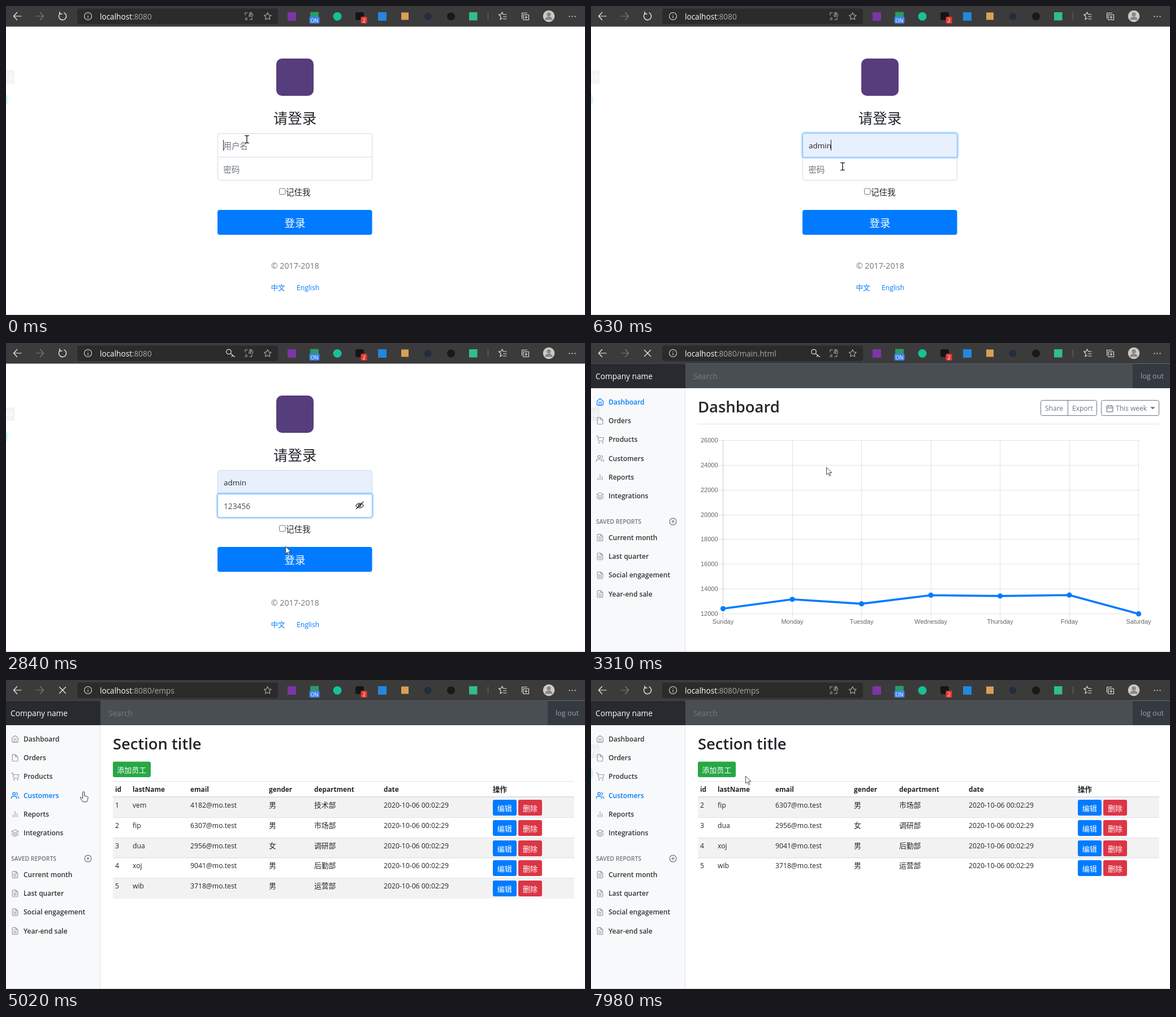
These frames come from a looping animation (1024x547 px, 8 s). An HTML page with a canvas:

```html
<!DOCTYPE html>
<html lang="zh">
<head>
<meta charset="utf-8">
<style>
html, body { margin: 0; width: 100%; height: 100%; overflow: hidden; background: #fff; }
canvas { display: block; }
</style>
</head>
<body>
<canvas id="stage" width="1024" height="547"></canvas>
<script>
const ctx = document.getElementById('stage').getContext('2d');
const LOOP = 8000, TICK = 156.5;
const SANS = '"Open Sans","Noto Sans CJK SC","Noto Sans CJK",sans-serif';
const ARIAL = '"Liberation Sans",sans-serif';
const BLUE = '#007bff', GREY = '#6c757d', INK = '#212529', RULE = '#dee2e6';

// drawing helpers
function text(s, x, y, size, color = INK, weight = 400, align = 'left', family = SANS) {
  ctx.font = `${weight} ${size}px ${family}`;
  ctx.textAlign = align;
  ctx.fillStyle = color;
  ctx.fillText(s, x, y);
}
function box(x, y, w, h, fill, radius = 0, stroke, width = 1) {
  ctx.beginPath();
  ctx.roundRect(x, y, w, h, radius);
  if (fill) { ctx.fillStyle = fill; ctx.fill(); }
  if (stroke) { ctx.strokeStyle = stroke; ctx.lineWidth = width; ctx.stroke(); }
}
function disc(x, y, r, fill) {
  ctx.beginPath();
  ctx.arc(x, y, r, 0, 7);
  ctx.fillStyle = fill;
  ctx.fill();
}
function path(d, color, width = 1.2, x = 0, y = 0, scale = 1, fill) {
  const p = new Path2D(d);
  ctx.save();
  ctx.translate(x, y);
  ctx.scale(scale, scale);
  ctx.lineWidth = width;
  ctx.lineCap = ctx.lineJoin = 'round';
  ctx.strokeStyle = color;
  if (fill) { ctx.fillStyle = fill; ctx.fill(p); }
  ctx.stroke(p);
  ctx.restore();
}
const ring = (x, y, r) => `M${x - r} ${y}a${r} ${r} 0 1 0 ${2 * r} 0a${r} ${r} 0 1 0 ${-2 * r} 0`;

// 24-unit line icons
const ICON = {
  home: 'M3 9l9-7 9 7v11a2 2 0 0 1-2 2H5a2 2 0 0 1-2-2zM9 22V12h6v10',
  file: 'M13 2H6a2 2 0 0 0-2 2v16a2 2 0 0 0 2 2h12a2 2 0 0 0 2-2V9zM13 2v7h7',
  cart: 'M1 1h4l2.7 13.4a2 2 0 0 0 2 1.6h9.7a2 2 0 0 0 2-1.6L23 6H6' + ring(9, 21, 1) + ring(20, 21, 1),
  users: 'M17 21v-2a4 4 0 0 0-4-4H5a4 4 0 0 0-4 4v2M23 21v-2a4 4 0 0 0-3-3.9M16 3.1a4 4 0 0 1 0 7.8' + ring(9, 7, 4),
  bars: 'M18 20V10M12 20V4M6 20v-6',
  layers: 'M12 2L2 7l10 5 10-5zM2 17l10 5 10-5M2 12l10 5 10-5',
  plus: ring(12, 12, 10) + 'M12 8v8M8 12h8',
  doc: 'M14 2H6a2 2 0 0 0-2 2v16a2 2 0 0 0 2 2h12a2 2 0 0 0 2-2V8zM14 2v6h6M16 13H8M16 17H8M10 9H8',
  calendar: 'M5 4h14a2 2 0 0 1 2 2v14a2 2 0 0 1-2 2H5a2 2 0 0 1-2-2V6a2 2 0 0 1 2-2zM16 2v4M8 2v4M3 10h18',
  star: 'M12 2l3.1 6.3 6.9 1-5 4.8 1.2 6.9L12 17.8 5.8 21 7 14.1 2 9.3l6.9-1z'
};
const icon = (name, cx, cy, color = '#999') => path(ICON[name], color, 2, cx - 7.15, cy - 7.15, 0.596);

function toolbar(k) {
  const loading = k >= 19 && k < 24 || k >= 30 && k < 37 || k >= 44 && k < 48;
  box(0, 0, 1024, 36.5, '#3b3b3b');
  box(126, 4.5, 355, 27.5, '#2b2b2b', 4);
  path('M13.5 18H27M19.5 11.5L13.5 18l6 6.5', '#f2f2f2');
  path('M53 18h13.5M60.5 11.5l6 6.5-6 6.5', '#7c7c7c');
  if (loading) path('M94.5 12.5l11 11M105.5 12.5l-11 11', '#f2f2f2');
  else path('M95.5 13.3A6.6 6.6 0 1 0 103 12.2M95 10.5V14h3.8', '#f2f2f2', 1.4);
  path(ring(145, 18, 6.5) + 'M145 17.5v3.8M145 14.8v.1', '#ddd', 1.1);

  const tail = k < 21 ? '' : k < 31 ? '/main.html' : '/emps';
  text('localhost', 166, 23.5, 13.6, '#fff');
  const w = ctx.measureText('localhost').width;
  text(':8080' + tail, 166 + w, 23.5, 13.6, '#a9a9a9');

  if (k >= 18 && k < 31) path(ring(394, 15.5, 4.2) + 'M397 18.5l7.5 6M401 22l-1.5 2', '#ddd', 1.3);
  if (k < 30 || k >= 37) {
    text('あ', 428, 19, 10, '#bbb');
    text('a', 422, 25, 9.5, '#bbb');
    path('M427 12h-4v4M431 24h4v-3', '#bbb', 1);
  }
  path(ICON.star, '#aaa', 1.8, 455, 10.5, 0.64);

  box(498, 11, 15, 15, '#7c35a6');
  box(538, 10.5, 15, 13, '#2a9b63', 1);
  box(536.5, 19, 18, 12, '#3f83f0', 2);
  text('ON', 545.5, 28.5, 9, '#fff', 400, 'center');
  disc(586, 18.5, 7.5, '#17c197');
  box(618, 11, 15, 14, '#151515', 3);
  box(627.5, 19, 11, 12, '#e53935', 2);
  text('2', 633, 28.5, 9, '#fff', 400, 'center');
  box(658, 11, 15, 15, '#2387dd');
  box(699, 11.5, 13, 13, '#d8a055');
  disc(746, 18.5, 6.5, '#222d3d');
  disc(787, 18.5, 7, '#191919');
  box(819, 11, 14.5, 14.5, '#31bd8d');
  path('M852.5 12v12', '#6c6c6c', 1);
  path('M871.5 15h4l2-4 2 4h5.5M871.5 15l3.5 3.5-1 5.5 3.5-2.5M879.5 19h5.5M879.5 23h5.5', '#e6e6e6', 1.1);
  path('M915 15.5h9.5v9H915zM912.5 22v-9.5h9M919.8 17.5v5M917.3 20h5', '#e6e6e6', 1.1);
  disc(960, 18, 10.3, '#cfcac8');
  disc(960, 14.8, 3.6, '#8a8684');
  path('M953.5 24a6.5 5 0 0 1 13 0z', '#8a8684', 0.5, 0, 0, 1, '#8a8684');
  for (const x of [996.5, 1001.5, 1006.5]) disc(x, 18.5, 1, '#eee');
}

function caret(x, y) { box(x, y, 1, 19, '#222'); }

function login(k) {
  box(478, 93, 66, 66, '#563d7c', 10);
  text('请登录', 511, 207.5, 25.5, INK, 400, 'center');

  const filled = k >= 2, userFocus = k >= 1 && k < 6, passFocus = k >= 6;
  const typed = '123456'.slice(0, Math.max(0, (k - 11) * 2 + 1));
  const field = (y, h, radius, focus, fill) => {
    if (focus) box(373, y - 1.5, 276, h + 3, null, 5, 'rgba(0,123,255,.25)', 3);
    box(374.5, y, 273, h, fill, radius, focus ? '#80bdff' : '#d3d8dd');
  };
  const user = () => field(225.5, 42, [4, 4, 0, 0], userFocus, filled ? '#e8f0fe' : '#fff');
  const pass = () => field(267.5, 41, [0, 0, 4, 4], passFocus, '#fff');
  if (userFocus) { pass(); user(); } else { user(); pass(); }

  if (filled) text('admin', 385, 252, 13.5);
  else text('用户名', 384.5, 252.5, 14.4, GREY);
  if (k < 6) caret(filled ? 424 : 384, 237);

  if (!typed) text('密码', 384.5, 294.5, 14.4, GREY);
  else if (k >= 16) text(typed, 385, 294, 13.7, '#495057');
  else for (let i = 0; i < typed.length; i++) disc(388 + i * 6.5, 289, 2.2, '#495057');
  if (k >= 6 && k < 14) caret(385 + typed.length * 6.5, 279);
  if (typed) {
    path('M618.5 288q7-8.5 14 0q-7 8-14 0' + ring(625.5, 287.5, 2.2), '#111', 1.1);
    if (k >= 16) path('M619.5 293.5l12.5-12.5', '#111', 1.1);
  }

  box(483.5, 323, 10.5, 10.5, '#fff', 2, '#767676');
  text('记住我', 495, 334.5, 14.5);
  box(374, 361, 273.5, 44, k >= 19 ? '#0069d9' : BLUE, 4);
  text('登录', 511, 391, 18.5, '#fff', 400, 'center');
  text('© 2017-2018', 511.3, 465, 14.2, GREY, 400, 'center');
  text('中文', 468.5, 503, 12.6, BLUE);
  text('English', 514, 503, 12.1, BLUE);
}

const MENU = [['home', 'Dashboard'], ['file', 'Orders'], ['cart', 'Products'],
  ['users', 'Customers'], ['bars', 'Reports'], ['layers', 'Integrations']];
const SAVED = ['Current month', 'Last quarter', 'Social engagement', 'Year-end sale'];

function frame(k) {
  box(0, 36.5, 1024, 43.5, '#343a40');
  box(0, 36.5, 167, 43.5, '#272b30');
  box(167, 36.5, 791, 43.5, '#494e53');
  text('Company name', 8, 64, 13.7, '#fff');
  text('Search', 181, 64, 13.6, '#747b81');
  text('log out', 972, 63, 12.7, '#a0a3a6');

  box(0, 80, 166, 467, '#f8f9fa');
  box(166, 80, 1, 467, '#e0e1e2');
  const active = k < 31 ? 0 : 3;
  const hover = k >= 24 && k < 26 ? 2 : k >= 26 && k < 31 ? 3 : -1;
  MENU.forEach(([name, label], i) => {
    const y = 104.5 + i * 33.3, on = i === active;
    icon(name, 16, y, on ? BLUE : i === hover ? '#333' : '#999');
    text(label, 31, y + 4.2, 12, on ? BLUE : '#333', 600);
  });
  text('SAVED REPORTS', 9, 320, 10.4, GREY, 600);
  icon('plus', 145, 316, GREY);
  SAVED.forEach((label, i) => {
    const y = 344.5 + i * 33.3;
    icon('doc', 16, y);
    text(label, 31, y + 4.2, 12, '#333', 600);
  });
}

const DAYS = ['Sunday', 'Monday', 'Tuesday', 'Wednesday', 'Thursday', 'Friday', 'Saturday'];
const SALES = [15339, 21345, 18483, 24003, 23489, 24092, 12034];

const heading = s => text(s, 189, 123, 27.4, INK, 600);

function dashboard(k) {
  heading('Dashboard');
  box(795.5, 101.5, 99, 27, null, 3, GREY);
  path('M843.5 102v26', GREY, 1);
  box(902.5, 101.5, 102, 27, null, 3, GREY);
  text('Share', 803, 120, 12, GREY);
  text('Export', 851, 120, 12, GREY);
  icon('calendar', 917.5, 116, GREY);
  text('This week', 928, 120, 12, GREY);
  path('M990 113.5h7l-3.5 3.5z', GREY, 0.6, 0, 0, 1, GREY);
  box(189, 143, 816, 1, RULE);

  const px = i => 233.5 + i * 122.5;
  for (let i = 0; i < 8; i++) {
    const y = Math.round(479 - i * 43.86);
    box(224, y, 745, 1, 'rgba(0,0,0,.1)');
    text(12000 + i * 2000, 224.5, y + 3.5, 11, '#666', 400, 'right', ARIAL);
  }
  DAYS.forEach((day, i) => {
    box(Math.floor(px(i)), 172, 1, 317, i ? 'rgba(0,0,0,.1)' : 'rgba(0,0,0,.2)');
    text(day, px(i), 497, 11, '#666', 400, 'center', ARIAL);
  });

  const run = Math.min(1, 0.033 + (k - 21) * TICK / 600);
  const grow = 1 - (1 - run) ** 4;
  const points = SALES.map((v, i) => [px(i), 479.5 - (v - 12000) * grow * 0.02193]);
  path('M' + points.join('L'), BLUE, 3.6);
  for (const [x, y] of points) disc(x, y, 4.6, BLUE);
}

const STAFF = [[1, 'vem', '4182@mo.test', '男', '技术部'], [2, 'fip', '6307@mo.test', '男', '市场部'],
  [3, 'dua', '2956@mo.test', '女', '调研部'], [4, 'xoj', '9041@mo.test', '男', '后勤部'],
  [5, 'wib', '3718@mo.test', '男', '运营部']];
const COLUMNS = [193, 224, 326, 465, 545, 668, 861];

function staffTable(k) {
  heading('Section title');
  box(189, 144.5, 67, 27.5, '#28a745', 3);
  text('添加员工', 222.3, 163.5, 13, '#fff', 400, 'center');
  box(189, 179, 816, 1, RULE);
  ['id', 'lastName', 'email', 'gender', 'department', 'date', '操作']
    .forEach((s, i) => text(s, COLUMNS[i], 198, i < 6 ? 11.8 : 12.6, INK, 700));
  box(189, 206, 816, 2, RULE);

  STAFF.slice(k >= 46 ? 1 : 0).forEach((row, i) => {
    const y = Math.round(208 + i * 35.75), pressed = !i && k >= 41 && k < 46;
    if (i % 2 === 0) box(189, y, 816, 36, '#f2f2f2');
    if (i) box(189, y - 1, 816, 1, RULE);
    [...row, '2020-10-06 00:02:29'].forEach((s, c) =>
      text(s, COLUMNS[c], y + 18.3, c === 3 || c === 4 ? 12.8 : 12.2));
    box(861, y + 4, 42, 28, BLUE, 3);
    if (pressed && k >= 44) box(904.5, y + 2.5, 45, 31, null, 4, 'rgba(220,53,69,.5)', 3);
    box(906, y + 4, 42, 28, pressed ? '#c82333' : '#dc3545', 3);
    text('编辑', 881.7, y + 23.5, 13, '#fff', 400, 'center');
    text('删除', 927, y + 23.5, 13, '#fff', 400, 'center');
  });
}

// pointer path: tick, x, y
const TRACK = [[0, 426, 236], [1, 426, 236], [4, 445, 284], [7, 445, 284], [9, 394, 285], [13, 480, 285],
  [16, 626, 288], [17, 585, 308], [18, 494, 360], [19, 497, 372], [20, 480, 330], [21, 416, 220],
  [24, 122, 171], [26, 118, 208], [28, 128, 198], [29, 128, 198], [30, 137, 198], [33, 137, 198],
  [36, 560, 225], [40, 920, 222], [42, 934, 226], [45, 934, 226], [50, 312, 170], [51, 273, 170]];

function pointer(k) {
  if (k >= 11 && k < 14) return;
  const n = Math.max(1, TRACK.findIndex(p => p[0] >= k));
  const [k0, x0, y0] = TRACK[n - 1], [k1, x1, y1] = TRACK[n];
  const u = (k - k0) / (k1 - k0), x = x0 + (x1 - x0) * u, y = y0 + (y1 - y0) * u;
  if (k < 16)
    path('M-3.5-6.5h2.5l1 1 1-1h2.5M0-5.5v11M-3.5 6.5h2.5l1-1 1 1h2.5', '#000', 1.2, x, y);
  else if (k >= 24 && k <= 33 || k >= 41 && k <= 45)
    path('M-1.5 1.2a1.5 1.5 0 0 1 3 0V7l5 1.2q1.8.5 1.6 2.4l-.9 4.2q-.3 2.7-2.2 2.9H0' +
      'q-1.6-.2-2.6-2.2L-5.6 11.2q-.6-1.8 1.2-1.8l2.9 2z', '#333', 1, x, y, 1, '#fff');
  else path('M.5.5V13l3-2.7 2.2 5 2-.9-2.2-4.8h4z', '#444', 1, x, y, 1, '#fff');
}

function edgeWidget(k) {
  if (k < 23 || k >= 36) {
    box(0, 114, 15, 24, 'rgba(0,0,0,.045)', 1);
    path('M1 123l3 3-3 3M6 123h4v6H6', 'rgba(255,255,255,.8)', 1.5);
  }
  if (k < 21 || k >= 36) disc(-11, 165.5, 15, 'rgba(0,215,225,.18)');
}

function draw(now) {
  const k = Math.min(51, Math.floor((now % LOOP + 6) / TICK));
  box(0, 0, 1024, 547, '#fff');
  toolbar(k);
  if (k < 21) login(k);
  else {
    frame(k);
    (k < 31 ? dashboard : staffTable)(k);
  }
  edgeWidget(k);
  box(0, 546, 1024, 1, '#d0d0d0');
  pointer(k);
}

const start = performance.now();
(function loop() {
  draw(performance.now() - start);
  requestAnimationFrame(loop);
})();
</script>
</body>
</html>
```
